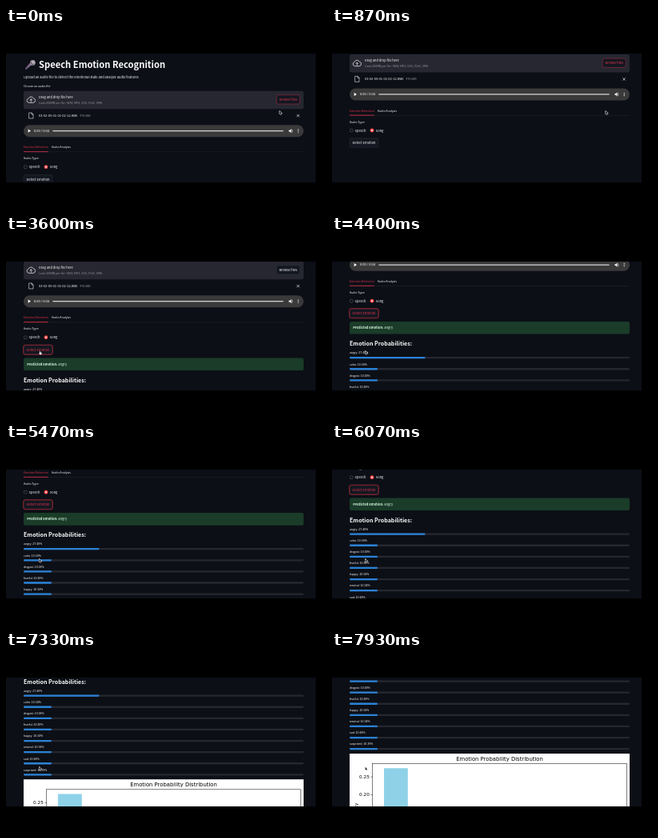
Animation of 400x225 px, one loop 8000 ms. Source, as an HTML page with a canvas:

```html
<!DOCTYPE html>
<html lang="en">
<head>
<meta charset="utf-8">
<title>Speech Emotion Recognition</title>
<style>
html, body { margin: 0; width: 100%; height: 100%; overflow: hidden; background: #000; }
canvas { display: block; width: 100vw; height: 100vh; }
</style>
</head>
<body>
<canvas id="stage"></canvas>
<script>
const W = 400, H = 225, LOOP = 8000, STEP = 1000 / 15;
const VIEW = { x: 0, y: 32, w: 387, h: 161 };
const LEFT = 22, RIGHT = 372, WIDE = RIGHT - LEFT;
const BG = '#0c0f16', CARD = '#262730', INK = '#fafafa', MUTED = '#96989f',
      RED = '#ff4b4b', RED_INK = '#e2324c', EDGE = '#3b3e46', BLUE = '#2a82d6';

// The Latin letters of the CJK face are drawn about 1.117 times larger per em.
const SANS = { family: '"Noto Sans CJK JP","Noto Sans CJK SC","Noto Sans CJK","Open Sans",sans-serif', fit: 1 / 1.117 };
const ROBOTO = { family: 'Roboto,sans-serif', fit: 1 };
const PLOT = { family: '"DejaVu Sans",sans-serif', fit: 1 };
const SMALL = 3.95, BODY = 4.5;

const SCROLL = [[0, 0], [70, 2], [330, 17], [600, 36], [870, 45.8], [3535, 45.8],
                [3600, 47], [4400, 92.5], [5470, 113.5], [5930, 131], [6070, 132],
                [6600, 156], [6870, 170], [7000, 172], [7930, 222.2]];
const MOUSE_X = [[0, 342], [930, 342], [1330, 120], [1500, 55], [1660, 41.6]];
const MOUSE_Y = [[0, 104], [930, 104], [1330, 148], [1500, 155], [1660, 143.8]];
const HOVER_AT = 1600, CLICK_AT = 1670, RESULT_AT = 2500;

const EMOTIONS = [['angry', 27.40], ['calm', 10.34], ['disgust', 10.38], ['fearful', 10.38],
                  ['happy', 10.34], ['neutral', 10.34], ['sad', 10.48], ['surprised', 10.35]];

const canvas = document.getElementById('stage');
const ctx = canvas.getContext('2d');
const dpr = window.devicePixelRatio || 1;
canvas.width = Math.round(W * dpr);
canvas.height = Math.round(H * dpr);

function track(keys, t) {
  const i = keys.findIndex(k => k[0] > t);
  if (i < 0) return keys[keys.length - 1][1];
  if (i === 0) return keys[0][1];
  const [t0, a] = keys[i - 1], [t1, b] = keys[i];
  return a + (b - a) * (t - t0) / (t1 - t0);
}

// Text is laid out large and scaled down so that advances stay fractional.
function text(str, x, cy, size, { color = INK, weight = 400, align = 'left', font = SANS, turn = 0 } = {}) {
  const zoom = 16;
  ctx.save();
  ctx.translate(x, cy);
  ctx.rotate(turn);
  ctx.scale(1 / zoom, 1 / zoom);
  ctx.font = `${weight} ${size * font.fit * zoom}px ${font.family}`;
  ctx.textAlign = align;
  ctx.fillStyle = color;
  ctx.fillText(str, 0, size * 0.33 * zoom);
  const width = ctx.measureText(str).width / zoom;
  ctx.restore();
  return width;
}

function rect(x, y, w, h, color) {
  ctx.fillStyle = color;
  ctx.fillRect(x, y, w, h);
}

function box(x, y, w, h, r, fill, stroke, line = 0.4) {
  ctx.beginPath();
  ctx.roundRect(x, y, w, h, r);
  if (fill) { ctx.fillStyle = fill; ctx.fill(); }
  if (stroke) { ctx.strokeStyle = stroke; ctx.lineWidth = line; ctx.stroke(); }
}

function disc(x, y, r, fill) {
  ctx.beginPath();
  ctx.arc(x, y, r, 0, Math.PI * 2);
  ctx.fillStyle = fill;
  ctx.fill();
}

function shape(d, x, y, { fill, stroke, line = 0.6 } = {}) {
  const path = new Path2D(d);
  ctx.save();
  ctx.translate(x, y);
  ctx.lineJoin = ctx.lineCap = 'round';
  if (stroke) { ctx.strokeStyle = stroke; ctx.lineWidth = line; ctx.stroke(path); }
  if (fill) { ctx.fillStyle = fill; ctx.fill(path); }
  ctx.restore();
}

function microphone() {
  shape('M0 10.6 L7 2.6 L9.6 5.2 L1.4 11.8 Q.2 12.4 0 10.6Z', 24, 40, { fill: '#6f5a78' });
  shape('M1 10.4 L7 3.6 L7.8 4.4Z', 24, 40, { fill: '#9d86a4' });
  disc(33.4, 43.4, 3.4, '#8f8796');
  disc(34, 42.8, 2.1, '#b3acb9');
  shape('M6.4 2.4 L10 6', 24, 40, { stroke: '#4d4256', line: 0.9 });
}

function header() {
  microphone();
  text('Speech Emotion Recognition', 41, 46, 12.5, { weight: 700 });
  text('Upload an audio file to detect the emotional state and analyze audio features', LEFT, 61.6, BODY);
  text('Choose an audio file', LEFT, 73, SMALL);
}

function uploader(t) {
  box(LEFT, 78.8, WIDE, 22.4, 2.2, CARD);
  shape('M2.6 8 A2.6 2.6 0 0 1 2.4 2.9 A3.4 3.4 0 0 1 8.7 2.7 A2.7 2.7 0 0 1 8.8 8Z M5.6 6.8 V3.6 M4.2 4.9 L5.6 3.5 L7 4.9',
    25.7, 85.3, { stroke: '#d4d5d8', line: 0.85 });
  text('Drag and drop file here', 41, 86.2, BODY);
  text('Limit 200MB per file • WAV, MP3, OGG, FLAC, M4A', 41, 93.4, SMALL, { color: MUTED });

  const focused = t < CLICK_AT;
  box(338.2, 83.8, 29, 11.2, 2, '#131720', focused ? RED_INK : EDGE);
  text('Browse files', 352.7, 89.4, BODY, { color: focused ? RED_INK : INK, align: 'center' });

  shape('M0 0 H3.1 L5 2 V7 H0Z M3.1 0 V2 H5', 29, 106, { stroke: '#d4d5d8', line: 0.65 });
  const w = text('03-02-05-01-01-02-12.wav', 41, 109.4, BODY);
  text('478.6KB', 41 + w + 3, 109.6, SMALL, { color: MUTED });
  shape('M0 0 L2.8 2.8 M2.8 0 L0 2.8', 363.7, 108.2, { stroke: INK, line: 0.65 });
}

function player() {
  box(LEFT, 121.2, WIDE, 15, 7.5, '#3a3a3b');
  shape('M0 0 L3.3 2.1 L0 4.2Z', 27.7, 126.5, { fill: '#fff' });
  text('0:00 / 0:04', 35, 128.6, 4, { font: ROBOTO });
  box(58.2, 128, 288.6, 1.2, 0.6, '#d5d5d5');
  shape('M0 1.5 H1.2 L2.8 0 V4.6 L1.2 3.1 H0Z', 353.5, 126.3, { fill: '#fff' });
  shape('M3.5 1.2 Q4.3 2.3 3.5 3.4 M3.6 0 Q6 2.3 3.6 4.6', 353.5, 126.3, { stroke: '#fff', line: 0.45 });
  for (const dy of [-1.7, 0, 1.7]) disc(365.2, 128.6 + dy, 0.55, '#fff');
}

function tabs() {
  const w = text('Emotion Detection', LEFT, 149, SMALL, { color: RED_INK });
  text('Audio Analysis', 57, 149, SMALL);
  rect(LEFT, 154.6, WIDE, 0.5, CARD);
  rect(LEFT, 154.3, w, 0.8, RED_INK);
}

function form(t) {
  text('Audio Type:', LEFT, 163, SMALL);
  disc(24.2, 173.7, 2.3, '#565962');
  disc(24.2, 173.7, 1.8, BG);
  text('Speech', 28.6, 173.7, BODY);
  disc(50, 173.7, 2.4, RED);
  disc(50, 173.7, 0.9, INK);
  text('Song', 54.8, 173.7, BODY);

  const active = t >= HOVER_AT;
  if (t >= CLICK_AT) box(21.6, 183.1, 36.8, 12.2, 2.5, null, 'rgba(255,75,75,0.38)', 1);
  box(22.1, 183.6, 35.8, 11.2, 2, '#131720', active ? RED_INK : EDGE);
  text('Detect Emotion', 40, 189.2, BODY, { color: active ? RED_INK : INK, align: 'center' });
}

function results() {
  box(LEFT, 199.5, WIDE, 15.6, 2.2, '#1a3c28');
  const w = text('Predicted Emotion:', 26.2, 207.4, BODY, { color: '#dffde9', weight: 700 });
  text('angry', 26.2 + w + 0.9, 207.4, BODY, { color: '#dffde9' });
  text('Emotion Probabilities:', LEFT, 227, 7.9, { weight: 700 });
  EMOTIONS.forEach(([name, value], i) => {
    const y = 238.6 + i * 14.1;
    text(`${name}: ${value.toFixed(2)}%`, LEFT, y, SMALL);
    box(LEFT, y + 4.9, WIDE, 2.3, 1.1, CARD);
    box(LEFT, y + 4.9, WIDE * Math.floor(value) / 100, 2.3, 1.1, BLUE);
  });
}

function chart() {
  const top = 349.2, black = { color: '#000', font: PLOT };
  const yOf = v => top + 29 + (0.25 - v) * 448;
  const x0 = 50.5, x1 = 368.5, axisTop = top + 12.6, zero = yOf(0);
  rect(LEFT, top, WIDE, 170, '#fff');
  text('Emotion Probability Distribution', 209.5, top + 6.7, 6.84, { ...black, align: 'center' });
  EMOTIONS.forEach(([, value], i) => {
    const y = yOf(value / 100);
    rect(65 + i * 37, y, 29.8, zero - y, '#8fd2e8');
  });
  ctx.strokeStyle = '#000';
  ctx.lineWidth = 0.5;
  ctx.strokeRect(x0, axisTop, x1 - x0, zero - axisTop);
  for (let i = 0; i <= 5; i++) {
    const v = i * 0.05, y = yOf(v);
    rect(x0 - 2, y - 0.25, 2, 0.5, '#000');
    text(v.toFixed(2), x0 - 3.7, y, 5.7, { ...black, align: 'right' });
  }
  text('Probability', 30, (axisTop + zero) / 2, 5.7, { ...black, align: 'center', turn: -Math.PI / 2 });
}

function cursor(t, scroll) {
  const x = track(MOUSE_X, t), y = track(MOUSE_Y, t);
  const onButton = t >= HOVER_AT && scroll < 51;
  if (onButton) {
    shape('M.9 2.6 V.5 Q1.3 -.1 1.7 .5 V1.6 L3.2 2 Q3.7 2.2 3.5 3 L3.1 4.5 H1.3 L0 2.8 Q.2 2.2 .9 2.6Z',
      x - 0.5, y, { fill: '#fff', stroke: '#333', line: 0.4 });
  } else {
    shape('M0 0 V3.7 L.9 2.9 L1.5 4.3 L2.1 4 L1.5 2.7 H2.7Z', x, y, { fill: '#222', stroke: '#f4f4f4', line: 0.9 });
  }
}

function draw(t) {
  const scroll = track(SCROLL, t);
  ctx.setTransform(dpr, 0, 0, dpr, 0, 0);
  rect(0, 0, W, H, '#000');
  ctx.save();
  ctx.beginPath();
  ctx.rect(VIEW.x, VIEW.y, VIEW.w, VIEW.h);
  ctx.clip();
  rect(VIEW.x, VIEW.y, VIEW.w, VIEW.h, BG);
  ctx.save();
  ctx.translate(0, -scroll);
  header();
  uploader(t);
  player();
  tabs();
  form(t);
  if (t >= RESULT_AT) {
    results();
    chart();
  }
  ctx.restore();
  cursor(t, scroll);
  ctx.restore();
}

function frame() {
  const t = performance.now() % LOOP;
  draw(Math.floor((t + 5) / STEP) * STEP);
  requestAnimationFrame(frame);
}
frame();
</script>
</body>
</html>
```
